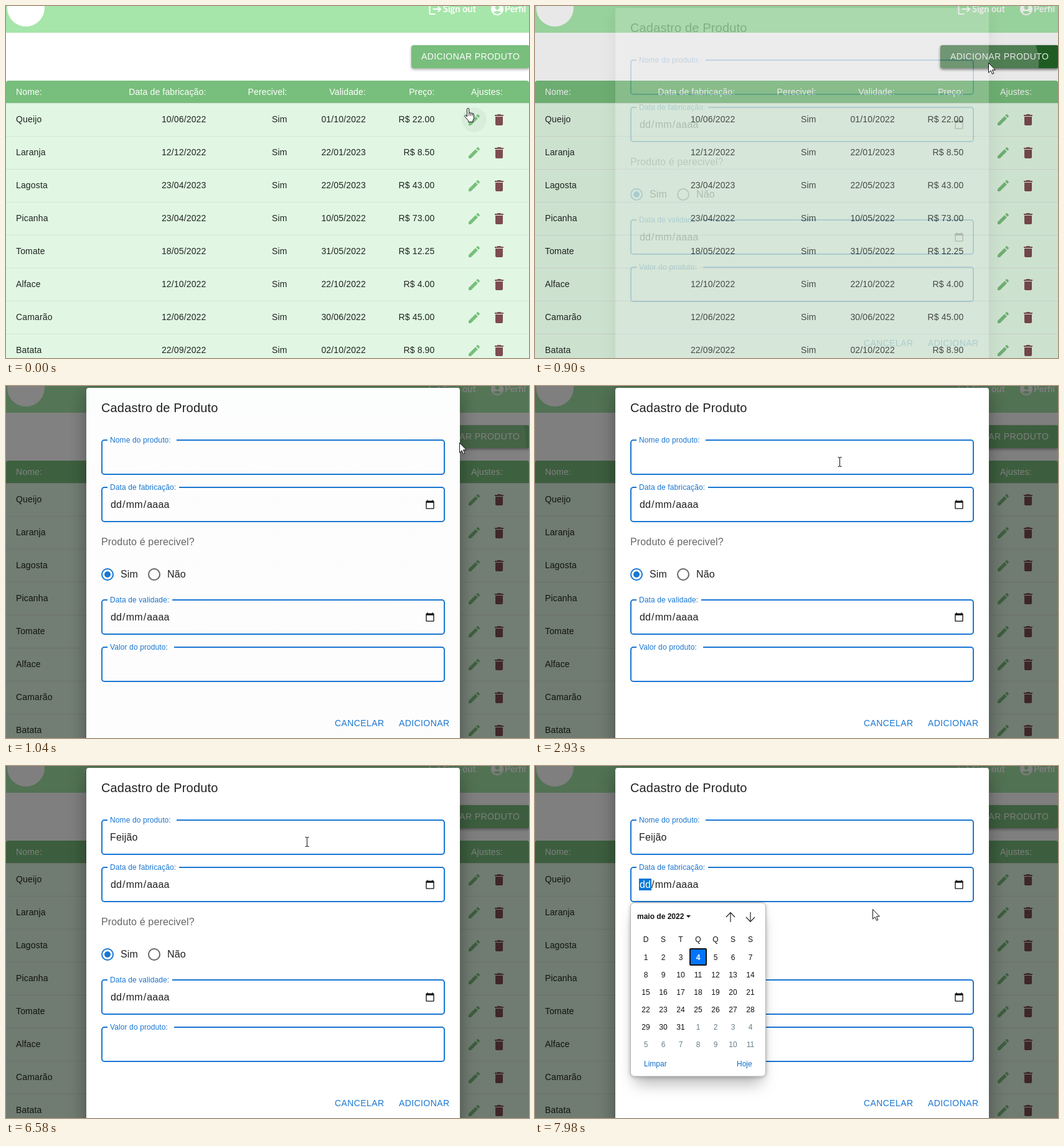
Animation of 840x566 px, one loop 8 s. Source, as an HTML page:

```html
<!DOCTYPE html>
<html lang="pt">
<head>
<meta charset="utf-8">
<title>Cadastro de Produto</title>
<style>
html, body { margin: 0; width: 100%; height: 100%; overflow: hidden; background: #fff; }
svg { display: block; width: 840px; height: 566px; }
text { font-family: "Liberation Sans", Arial, sans-serif; white-space: pre; }
.cell { font-size: 14px; letter-spacing: .15px; fill: #1f2520; }
.head { font-size: 14px; letter-spacing: .15px; fill: #fff; }
.btn { font-size: 14px; letter-spacing: .4px; fill: #1976d2; }
.nav { font: 700 14.5px Lato, sans-serif; fill: #fff; }
.title { font-size: 20px; letter-spacing: .15px; fill: #212121; }
.label { font-size: 12px; letter-spacing: .11px; fill: #1976d2; }
.input { font-size: 16px; letter-spacing: .15px; fill: #212121; }
.day { font-size: 12px; fill: #111; }
.raised { filter: drop-shadow(0 2px 2px rgba(0,0,0,.35)); }
.paper { filter: drop-shadow(0 9px 14px rgba(0,0,0,.35)); }
.soft { filter: drop-shadow(0 12px 12px rgba(0,0,0,.28)); }
.edge { filter: drop-shadow(0 1px 3px rgba(0,0,0,.25)); }
</style>
</head>
<body>
<svg id="stage" viewBox="0 0 840 566"></svg>
<script>
const GREEN = '#78be7c', BLUE = '#1976d2';
const PENCIL = 'M3 17.25V21h3.75L17.81 9.94l-3.75-3.75L3 17.25zM20.71 7.04c.39-.39.39-1.02 0-1.41l-2.34-2.34a1 1 0 0 0-1.41 0l-1.83 1.83 3.75 3.75 1.83-1.83z';
const TRASH = 'M6 19c0 1.1.9 2 2 2h8c1.1 0 2-.9 2-2V7H6v12zM19 4h-3.5l-1-1h-5l-1 1H5v2h14V4z';
const LOGOUT = 'm17 7-1.41 1.41L18.17 11H8v2h10.17l-2.58 2.58L17 17l5-5zM4 5h8V3H4c-1.1 0-2 .9-2 2v14c0 1.1.9 2 2 2h8v-2H4V5z';
const PERSON = 'M12 2C6.48 2 2 6.48 2 12s4.48 10 10 10 10-4.48 10-10S17.52 2 12 2zm0 4c1.93 0 3.5 1.57 3.5 3.5S13.93 13 12 13s-3.5-1.57-3.5-3.5S10.07 6 12 6zm0 14c-2.03 0-4.43-.82-6.14-2.88C7.55 15.8 9.68 15 12 15s4.45.8 6.14 2.12C16.43 19.18 14.03 20 12 20z';
const CALENDAR = 'M20 3h-1V1h-2v2H7V1H5v2H4c-1.1 0-2 .9-2 2v16c0 1.1.9 2 2 2h16c1.1 0 2-.9 2-2V5c0-1.1-.9-2-2-2zm0 18H4V8h16v13z';

// Markup helpers
const text = (x, y, s, cls, more = '') => `<text x="${x}" y="${y}" class="${cls}" ${more}>${s}</text>`;
const right = (x, y, s, cls) => text(x, y, s, cls, 'text-anchor="end"');
const rect = (x, y, w, h, fill, more = '') => `<rect x="${x}" y="${y}" width="${w}" height="${h}" fill="${fill}" ${more}/>`;
const circle = (x, y, r, more) => `<circle cx="${x}" cy="${y}" r="${r}" ${more}/>`;
const icon = (x, y, d, fill, k = 1) => `<path transform="translate(${x} ${y}) scale(${k})" d="${d}" fill="${fill}"/>`;

function table() {
  const cols = [321.5, 451.5, 578, 688.5];
  const rows = [
    'Queijo|10/06/2022|Sim|01/10/2022|R$ 22.00',
    'Laranja|12/12/2022|Sim|22/01/2023|R$ 8.50',
    'Lagosta|23/04/2023|Sim|22/05/2023|R$ 43.00',
    'Picanha|23/04/2022|Sim|10/05/2022|R$ 73.00',
    'Tomate|18/05/2022|Sim|31/05/2022|R$ 12.25',
    'Alface|12/10/2022|Sim|22/10/2022|R$ 4.00',
    'Camarão|12/06/2022|Sim|30/06/2022|R$ 45.00',
    'Batata|22/09/2022|Sim|02/10/2022|R$ 8.90'
  ];
  const line = (s, y, cls) => {
    const [name, ...rest] = s.split('|');
    return text(16, y, name, cls) + rest.map((v, i) => right(cols[i], y, v, cls)).join('');
  };
  let out = rect(0, 130, 840, 436, '#e1f7e3')
    + `<path d="M0 156V124q0-4 4-4H836q4 0 4 4V156Z" fill="${GREEN}"/>`
    + line('Nome:|Data de fabricação:|Perecivel:|Validade:|Preço:', 143, 'head')
    + right(798, 143, 'Ajustes:', 'head')
    + rect(0, 156, 840, 1, '#d9e6da')
    + circle(752, 183, 20, 'id="halo" fill="#000"');
  rows.forEach((s, i) => {
    const y = 53 * i;
    out += line(s, 187 + y, 'cell') + rect(0, 209 + y, 840, 1, '#d8e2d9')
      + icon(740, 171 + y, PENCIL, GREEN) + icon(780, 171 + y, TRASH, '#7c4c50');
  });
  return out;
}

function page() {
  return rect(0, 0, 840, 566, '#fff') + rect(0, 0, 840, 43, '#a6e6aa')
    + circle(32, 3, 30, 'fill="#fff"')
    + icon(677.5, -7, LOGOUT, '#fff') + text(702, 10, 'Sign out', 'nav')
    + icon(777, -7, PERSON, '#fff') + text(801, 10, 'Perfil', 'nav')
    + '<clipPath id="clip"><rect x="651" y="63" width="190" height="37" rx="4"/></clipPath>'
    + rect(651, 63, 190, 37, GREEN, 'rx="4" class="raised"')
    + rect(651, 63, 190, 37, '#1b5e20', 'rx="4" class="raised" id="dark"')
    + `<g clip-path="url(#clip)">${circle(727, 91, 1, 'id="ripple" fill="#fff"')}</g>`
    + text(667, 86, 'ADICIONAR PRODUTO', 'btn', 'style="fill:#fff"')
    + table();
}

const field = (y, label, gapEnd) =>
  rect(154, y, 550, 55, 'none', `rx="4" stroke="${BLUE}" stroke-width="2"`)
  + rect(163, y - 2, gapEnd - 163, 4, '#fff') + text(167, y + 4, label, 'label');

const dateParts = (y, id) => text(168, y, 'dd', 'input', `id="${id}"`)
  + text(187.1, y, '/', 'input') + text(192.7, y, 'mm', 'input')
  + text(220.7, y, '/', 'input') + text(226.3, y, 'aaaa', 'input')
  + icon(673, y - 13.5, CALENDAR, '#111', 2 / 3);

function dialog() {
  return rect(129, 3, 600, 620, '#fff', 'rx="4" class="paper"')
    + text(153, 42, 'Cadastro de Produto', 'title')
    + field(87, 'Nome do produto:', 274)
    + text(167, 120, '', 'input', 'id="typed"') + rect(167, 106, 1, 17, '#111', 'id="caret"')
    + field(163, 'Data de fabricação:', 278)
    + rect(167, 181, 20, 19, '#0078d7', 'id="mark"') + dateParts(196, 'dd')
    + text(153, 256, 'Produto é perecivel?', 'input', 'style="fill:#666"')
    + circle(163, 303, 9, `fill="none" stroke="${BLUE}" stroke-width="2"`)
    + circle(163, 303, 5, `fill="${BLUE}"`) + text(184, 308, 'Sim', 'input')
    + circle(238, 303, 9, 'fill="none" stroke="#666" stroke-width="2"')
    + text(259, 308, 'Não', 'input')
    + field(344, 'Data de validade:', 267) + dateParts(377, 'dd2')
    + field(420, 'Valor do produto:', 270)
    + text(528, 547, 'CANCELAR', 'btn') + text(631, 547, 'ADICIONAR', 'btn');
}

function picker() {
  const mid = (x, y, s, style = '') => text(x, y, s, 'day', `text-anchor="middle" style="${style}"`);
  const arrow = (x, dir) => `<path transform="translate(${x} 243) scale(1 ${dir})" d="M0 8V-7M-7 0L0-7.3 7 0" fill="none" stroke="#222" stroke-width="1.2"/>`;
  let out = rect(160, 230, 204, 269, '#fff', 'rx="6" class="soft"')
    + rect(153.5, 220, 217, 279, '#fff', 'rx="6" stroke="#b4b4b4" class="edge"')
    + text(164, 246, 'maio de 2022', 'day', 'font-weight="700"')
    + '<path d="M243 240h7l-3.5 4z" fill="#111"/>' + arrow(314, 1) + arrow(346, -1)
    + rect(249, 294, 26, 26, '#0075ff', 'rx="1" stroke="#101010" stroke-width="2"');
  [...'DSTQQSS'].forEach((d, i) => out += mid(178 + 28 * i, 283, d));
  for (let i = 0; i < 42; i++) {
    const style = i === 3 ? 'fill:#fff;font-weight:700' : i > 30 ? 'fill:#657f88' : '';
    out += mid(178 + 28 * (i % 7), 312 + 28 * Math.floor(i / 7), i % 31 + 1, style);
  }
  const link = 'style="fill:#0b6fcc"';
  return out + text(175, 483, 'Limpar', 'day', link) + text(324, 483, 'Hoje', 'day', link);
}

const pointers = `
<path id="arrow" d="M.5.5V16.2L4.1 12.8 6.6 18.4 8.9 17.4 6.5 11.8H11.4Z" fill="#fff" stroke="#111"/>
<path id="hand" d="M-1.5 14V1.9a1.6 1.6 0 0 1 3.2 0V8q1.5-1.2 2.9.4 1.6-1 2.7.5 2.2-.4 2.2 1.8V15.5q0 2-1.6 4.2V22.5H.6V20.3L-4.8 14.2q-1.3-2 .6-2.7 1.4-.2 2.7 2.5ZM1.7 8v4.5M4.6 8.6v4M7.3 9v3.6" fill="#fff" stroke="#111"/>
<path id="beam" d="M-2.5-7.5H-1Q.5-7.5.5-6V6Q.5 7.5-1 7.5H-2.5M3.5-7.5H2Q.5-7.5.5-6V6Q.5 7.5 2 7.5H3.5" fill="none" stroke="#111"/>`;

document.getElementById('stage').innerHTML = page()
  + rect(0, 0, 840, 566, '#000', 'id="shade"')
  + `<g id="dialog">${dialog()}</g><g id="picker">${picker()}</g><g id="pointer">${pointers}</g>`;

const el = id => document.getElementById(id);
const set = (id, attrs) => { for (const k in attrs) el(id).setAttribute(k, attrs[k]); };
const show = (id, on) => set(id, { visibility: on ? 'visible' : 'hidden' });
const clamp = v => Math.min(1, Math.max(0, v));

// cubic-bezier(.4, 0, .2, 1)
function ease(p) {
  p = clamp(p);
  if (p === 0 || p === 1) return p;
  let lo = 0, hi = 1;
  for (let i = 0; i < 20; i++) {
    const u = (lo + hi) / 2, v = 1 - u;
    if (1.2 * v * v * u + .6 * v * u * u + u * u * u < p) lo = u; else hi = u;
  }
  return lo * lo * (3 - 2 * lo);
}
const ramp = (t, start, len) => ease((t - start) / len);

// [time, x, y]
const path = [
  [70, 742, 164], [580, 727.5, 91], [1060, 727.5, 91], [1720, 500, 125],
  [1960, 489, 122], [6520, 489, 122], [6580, 483, 122], [7160, 690, 194],
  [7340, 683, 192], [7400, 683, 192], [7960, 542, 230]
];
function pointerAt(t) {
  const i = path.findIndex(p => p[0] > t);
  if (i === 0) return path[0].slice(1);
  if (i < 0) return path[path.length - 1].slice(1);
  const a = path[i - 1], b = path[i], p = (t - a[0]) / (b[0] - a[0]), k = p * p * (3 - 2 * p);
  return [a[1] + (b[1] - a[1]) * k, a[2] + (b[2] - a[2]) * k];
}
function pointerKind(t, x, y) {
  if (t < 800) return Math.hypot(x - 752, y - 183) < 23 || (y < 100 && y > 63) ? 'hand' : 'arrow';
  const name = x > 153 && x < 705 && y > 86 && y < 143;
  const date = x > 153 && x < 665 && y > 162 && y < 219;
  return t > 850 && (name || date) ? 'beam' : 'arrow';
}

// [time, letters typed, caret visible]
const typing = [
  [0, 0, 0], [1970, 0, 1], [2470, 0, 0], [2660, 0, 1], [2930, 0, 0], [3460, 0, 1],
  [3920, 1, 1], [4380, 1, 0], [4530, 2, 1], [4660, 3, 1], [5190, 3, 0], [5320, 4, 1],
  [5850, 5, 1], [6050, 6, 1], [6580, 6, 0], [7080, 6, 1], [7400, 6, 0]
];
const caretX = [167, 176, 186, 189, 193, 202, 211];

function render(t) {
  set('halo', { opacity: .04 * (1 - ramp(t, 130, 150)) });
  set('dark', { opacity: ramp(t, 400, 250) * (1 - ramp(t, 860, 250)) });
  const grow = ramp(t, 650, 550);
  set('ripple', { r: 115 * grow, opacity: t < 650 ? 0 : (.1 + .2 * grow) * (1 - ramp(t, 850, 550)) });

  const open = ramp(t, 850, 225);
  set('shade', { opacity: .5 * open });
  set('dialog', { opacity: open });

  const [, n, on] = typing.filter(s => s[0] <= t).pop();
  el('typed').textContent = 'Feijão'.slice(0, n);
  set('caret', { x: caretX[n], opacity: on });

  const picking = t >= 7410;
  show('picker', picking);
  show('mark', picking);
  el('dd').style.fill = picking ? '#fff' : '';

  const [x, y] = pointerAt(t), kind = pointerKind(t, x, y);
  set('pointer', { transform: `translate(${Math.round(x)} ${Math.round(y)})` });
  for (const id of ['arrow', 'hand', 'beam']) show(id, id === kind);
}

const start = performance.now();
function tick() {
  render((performance.now() - start) % 8000);
  requestAnimationFrame(tick);
}
tick();
</script>
</body>
</html>
```
